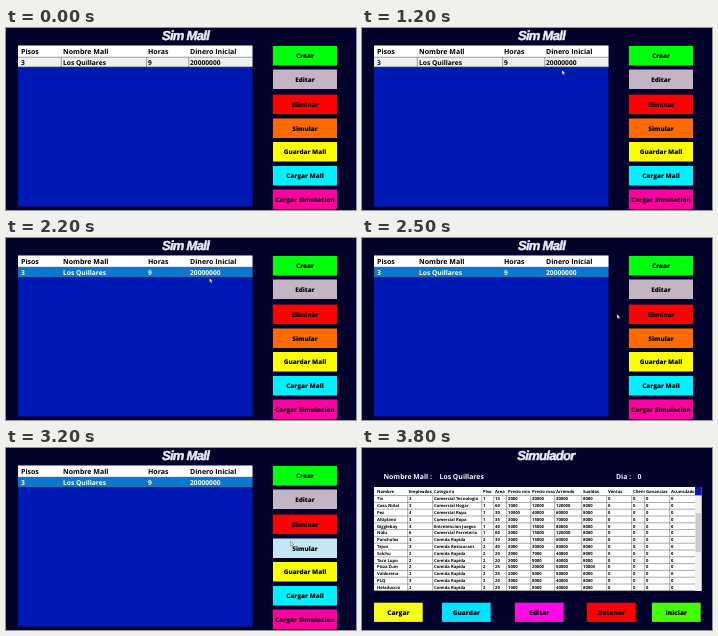
These frames come from a looping animation (350 by 182 pixels, 4.7 s). An HTML page:

```html
<!DOCTYPE html>
<html lang="es">
<head>
<meta charset="utf-8">
<title>Sim Mall</title>
<style>
  html, body { margin: 0; width: 100%; height: 100%; overflow: hidden; background: #02022b; }
  svg { display: block; width: 350px; height: 182px; }
  text { font-family: "Open Sans", "Noto Sans", sans-serif; font-weight: 700; text-rendering: geometricPrecision; white-space: pre; }
  .title { font: italic 700 13px "Liberation Sans", sans-serif; letter-spacing: -.7px; fill: #ececfa; stroke: #ececfa; stroke-width: .5px; text-anchor: middle; }
  .head { font-size: 7px; }
  .list { font-size: 6.7px; }
  .label { font-size: 6.9px; fill: #f2f2fa; }
  .cell { font-size: 4.2px; }
  .button { font-weight: 800; text-anchor: middle; }
</style>
</head>
<body>
<svg id="stage" viewBox="0 0 350 182"></svg>
<script>
const LOOP = 4700;
const MALL = 'Los Quillares';
const stage = document.getElementById('stage');

function add(parent, tag, attrs = {}, content = '') {
  const node = document.createElementNS('http://www.w3.org/2000/svg', tag);
  for (const [key, value] of Object.entries(attrs)) node.setAttribute(key, value);
  node.textContent = content;
  parent.append(node);
  return node;
}
const rect = (parent, x, y, width, height, fill) => add(parent, 'rect', { x, y, width, height, fill });
const line = (parent, d, stroke, width = 0.6) =>
  add(parent, 'path', { d, stroke, 'stroke-width': width, fill: 'none' });
const text = (parent, x, y, content, kind) => add(parent, 'text', { x, y, class: kind }, content);

function button(parent, x, y, width, height, fill, label, size) {
  const face = rect(parent, x, y, width, height, fill);
  text(parent, x + width / 2, y + height / 2 + size * 0.36, label, 'button').style.fontSize = size + 'px';
  return face;
}

rect(stage, 0, 0, 350, 182, '#02022b');

// Mall list
const menu = add(stage, 'g');
text(menu, 179.5, 11.5, 'Sim Mall', 'title');
rect(menu, 12, 17.5, 234.5, 161, '#0018b4');
rect(menu, 12, 17.5, 234.5, 11.5, '#fff');
const columns = [15, 57, 142, 184];
['Pisos', 'Nombre Mall', 'Horas', 'Dinero Inicial'].forEach((s, i) => text(menu, columns[i], 26.2, s, 'head'));
const row = add(menu, 'g');
const rowFace = rect(row, 12, 29, 234.5, 10, '#f0f0f0');
line(row, 'M12 29.2H246.5M12 38.8H246.5M55.3 29V39M140.6 29V39M182.8 29V39', '#62626c');
['3', MALL, '9', '20000000'].forEach((s, i) => text(row, columns[i], 36.6, s, 'list'));

const faces = [
  ['Crear', '#00ff0d', 18], ['Editar', '#c3b5c3', 41.5], ['Eliminar', '#ff0000', 66.6],
  ['Simular', '#ff6a00', 90.5], ['Guardar Mall', '#fcff00', 114],
  ['Cargar Mall', '#00f0ff', 138], ['Cargar Simulacion', '#ff00a0', 161.5]
].map(([label, fill, y]) => button(menu, 267, y, 64, 19.5, fill, label, 6.35));
const simulate = faces[3];
const cursor = add(menu, 'path', {
  d: 'M0 0V4.4L1.1 3.5L1.9 5.2L2.7 4.8L1.9 3.2H3.2Z',
  fill: '#fff', stroke: '#222', 'stroke-width': 0.35
});

// Simulator
const sim = add(stage, 'g');
text(sim, 184, 11.5, 'Simulador', 'title');
[[21.5, 'Nombre Mall :'], [77.5, MALL], [254, 'Dia :'], [275.5, '0']].forEach(([x, s]) => text(sim, x, 31.2, s, 'label'));

const heads = [
  ['Nombre', 15], ['Empleados', 47], ['Categoria', 72], ['Piso', 121], ['Area', 133],
  ['Precio min', 146], ['Precio max', 170], ['Arriendo', 194], ['Sueldos', 221],
  ['Ventas', 246], ['Clientes', 271], ['Ganancias', 284], ['Acumulado', 309]
];
const FAST = 'Comida Rapida';
const shops = [
  ['Tiv', 3, 'Comercial Tecnologia', 15, 2000, 30000],
  ['Casa Nidal', 3, 'Comercial Hogar', 60, 1000, 12000],
  ['Pez', 4, 'Comercial Ropa', 30, 10000, 40000],
  ['Altiplano', 3, 'Comercial Ropa', 35, 3000, 15000],
  ['Gigglebay', 4, 'Entretencion Juegos', 40, 5000, 15000],
  ['Nidu', 6, 'Comercial Ferreteria', 60, 2000, 15000],
  ['Pancholos', 3, FAST, 30, 2000, 15000],
  ['Tejon', 3, 'Comida Restaurant', 40, 5000, 30000],
  ['Salchu', 2, FAST, 20, 2000, 7000],
  ['Taco Lupo', 2, FAST, 20, 2000, 9000],
  ['Pizza Zum', 2, FAST, 25, 5000, 20000, 10000],
  ['Valdorena', 2, FAST, 25, 2000, 8000],
  ['PLQ', 3, FAST, 20, 3000, 8000],
  ['Heladuccio', 2, FAST, 20, 1000, 8000]
];
const TOP = 47.6, PITCH = 6.8, BOTTOM = TOP + shops.length * PITCH;
rect(sim, 12, 39, 327.5, BOTTOM - 39, '#fff');
heads.forEach(([label, x], i) => {
  const end = heads[i + 1] ? heads[i + 1][1] - 1 : 333;
  const clip = add(sim, 'clipPath', { id: 'col' + i });
  rect(clip, x - 1, 39, end - x + 0.8, BOTTOM - 39, '#fff');
  const column = add(sim, 'g', { 'clip-path': `url(#col${i})` });
  text(column, x, 45, label, 'cell');
  shops.forEach(([name, staff, kind, area, low, high, wage = 8000], n) => {
    const values = [name, staff, kind, n < 6 ? 1 : 2, area, low, high, area * 2000, wage, 0, 0, 0, 0];
    text(column, x, TOP + n * PITCH + 4.8, values[i], 'cell');
  });
  if (i) line(sim, `M${x - 1.3} ${TOP}V${BOTTOM}`, '#555', 0.5);
});
for (let n = 0; n <= shops.length; n++) line(sim, `M12 ${TOP + n * PITCH}H333`, '#555', 0.5);
rect(sim, 333, 39, 6.5, TOP - 39, '#0018b4');
rect(sim, 333, TOP, 6.5, BOTTOM - TOP, '#f0f0f0');
rect(sim, 333.5, 65, 5.5, 39, '#cdcdcd');

[
  ['Cargar', '#f8ff14', 12], ['Guardar', '#00e0ff', 80], ['Editar', '#ff0ae6', 153],
  ['Detener', '#ff0000', 225], ['Iniciar', '#44ff00', 290]
].forEach(([label, fill, x]) => button(sim, x, 154.7, 48.7, 19.2, fill, label, 6.5));

// Steps: [start time, value...]
const pointer = [
  [0, -20, -20], [500, 175, 148], [600, 178, 127], [700, 182, 108], [800, 186, 94],
  [900, 190, 80], [1000, 194, 68], [1100, 197, 52], [1200, 200, 42], [1400, 200, 39],
  [1500, 201, 37], [1700, 201.5, 36.5], [2200, 203.5, 40], [2300, 215, 48], [2400, 234, 61],
  [2500, 255, 76], [2600, 274, 88], [2700, 281.5, 91], [3100, 284.5, 93.5]
];
const rowStates = [[0, '#f0f0f0', '#000'], [1900, '#0878d2', '#fff'], [3400, '#f0f0f0', '#000']];
const hover = [[0, '#ff6a00'], [2600, '#bee6fd'], [3100, '#c4e5f2']];
const at = (steps, t) => steps.findLast(step => step[0] <= t).slice(1);

const start = performance.now();
function draw() {
  const t = (performance.now() - start) % LOOP;
  const running = t >= 3800;
  menu.style.display = running ? 'none' : '';
  sim.style.display = running ? '' : 'none';
  cursor.setAttribute('transform', `translate(${at(pointer, t)})`);
  const [fill, ink] = at(rowStates, t);
  rowFace.setAttribute('fill', fill);
  row.querySelectorAll('text').forEach(label => label.setAttribute('fill', ink));
  simulate.setAttribute('fill', at(hover, t)[0]);
  requestAnimationFrame(draw);
}
draw();
</script>
</body>
</html>
```
